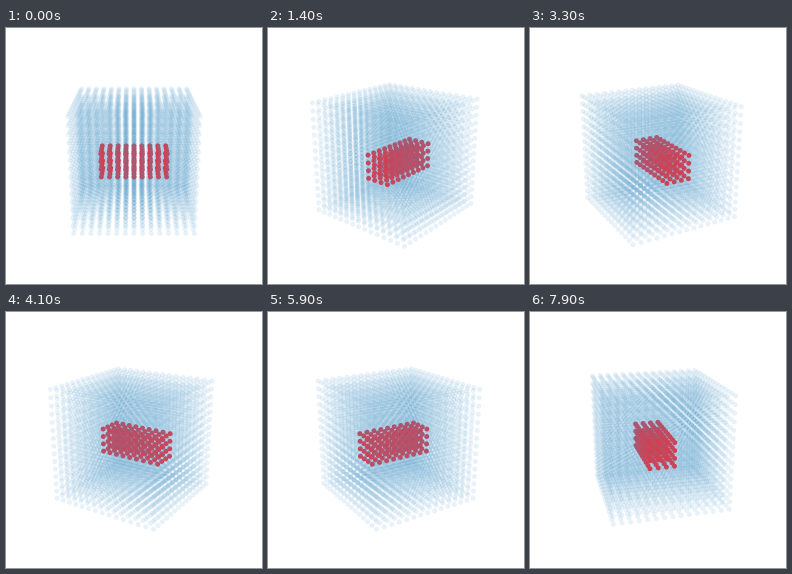
A matplotlib script for the animation above (8 s loop, 256 by 256 pixels).

```python
import numpy as np
import matplotlib.pyplot as plt
from matplotlib.animation import FuncAnimation
from matplotlib.colors import to_rgba

SIZE, DPI = 256, 100
FRAMES, INTERVAL = 80, 100
STEP = np.radians(3.6)      # turn per frame
ELEV = np.radians(20)
DIST, SCALE = 8.4, 56.1     # camera distance in half cubes, px per half cube
HALF = 7                    # grid runs from -7 to 7 on every axis
DOT = 5.0                   # dot diameter in px

BLUE = to_rgba("#4a98c9", 0.12)
RED = to_rgba("#d53e4f", 1)

axis = np.arange(-HALF, HALF + 1)
gx, gy, gz = (g.ravel() for g in np.meshgrid(axis, axis, axis))
core = (abs(gx) <= 4) & (gy >= -1) & (gy <= 2) & (gz >= -2) & (gz <= 1)
colors = np.where(core[:, None], RED, BLUE)
px, py, pz = gx / HALF, gy / HALF, gz / HALF


def project(angle):
    """Return screen positions in px and the nearness of every dot."""
    c, s = np.cos(angle), np.sin(angle)
    side = px * c + py * s
    front = py * c - px * s
    near = front * np.cos(ELEV) + pz * np.sin(ELEV)
    up = pz * np.cos(ELEV) - front * np.sin(ELEV)
    k = SCALE / (1 - near / DIST)
    return np.column_stack([SIZE / 2 + side * k, SIZE / 2 - up * k]), near


fig = plt.figure(figsize=(SIZE / DPI, SIZE / DPI), dpi=DPI, facecolor="white")
ax = fig.add_axes([0, 0, 1, 1])
ax.set_xlim(0, SIZE)
ax.set_ylim(SIZE, 0)
ax.axis("off")
dots = ax.scatter(px, py, s=(DOT * 72 / DPI) ** 2, c=colors, linewidths=0)


def update(frame):
    pos, near = project(frame * STEP)
    order = np.argsort(near, kind="stable")
    dots.set_offsets(pos[order])
    dots.set_facecolors(colors[order])
    return (dots,)


anim = FuncAnimation(fig, update, frames=FRAMES, interval=INTERVAL,
                     repeat=True, repeat_delay=0, blit=False)
plt.show()
```
